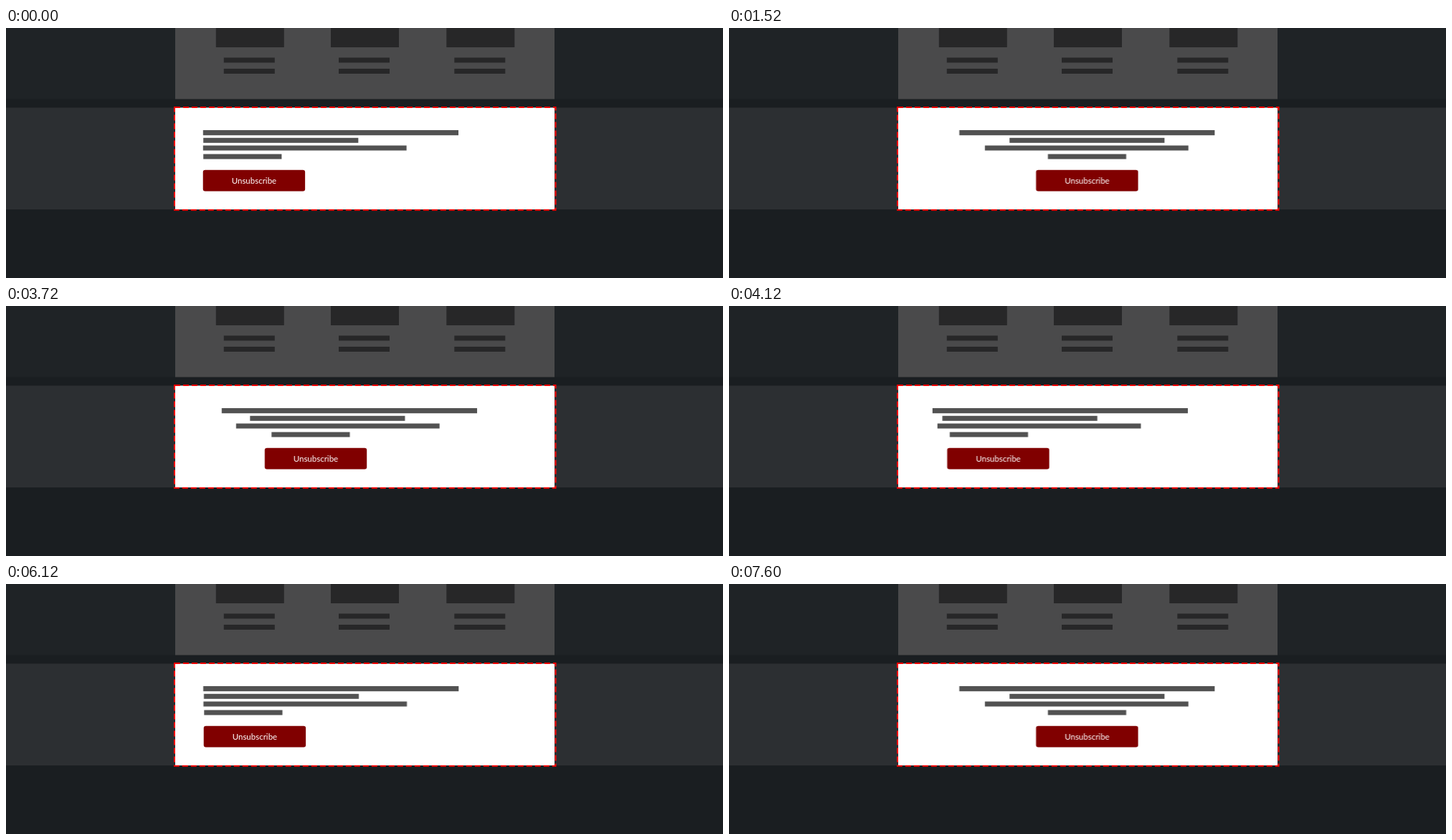
Animation of 1000 by 350 pixels, one loop 8 s. Source, as an HTML page:

```html
<!DOCTYPE html>
<html lang="en">
<head>
<meta charset="utf-8">
<title>Alignment</title>
<style>
  html, body { margin: 0; width: 100%; height: 100%; overflow: hidden; background: #1a1e21; }
  svg { display: block; width: 1000px; height: 350px; }
  .tile { fill: #272728; }
  .line { fill: #525252; }
  .slide {
    animation: align 8s cubic-bezier(.3333, 0, .6667, 1) -11ms infinite;
  }
  text { font: 11.5px Lato, sans-serif; fill: #fff; text-anchor: middle; }

  /* left, centre, left, centre, with holds between the moves */
  @keyframes align {
    0%, 37.8125% { transform: translateX(0); }
    19.25% { transform: translateX(var(--dx)); }
    37.8125% { transform: translateX(var(--dx)); }
    57.0625%, 75.725% { transform: translateX(0); }
    94.975%, 100% { transform: translateX(var(--dx)); }
  }
  @keyframes align {
    0% { transform: translateX(0); }
    19.25%, 37.8125% { transform: translateX(var(--dx)); }
    57.0625%, 75.725% { transform: translateX(0); }
    94.975%, 100% { transform: translateX(var(--dx)); }
  }
</style>
</head>
<body>
<svg viewBox="0 0 1000 350">
  <defs>
    <g id="card" class="tile">
      <rect width="95" height="27"/>
      <rect x="11" y="41.5" width="71" height="7"/>
      <rect x="11" y="57" width="71" height="7"/>
    </g>
  </defs>

  <rect width="1000" height="99.5" fill="#1f2326"/>
  <rect y="111.5" width="1000" height="142.5" fill="#2c2f32"/>

  <rect x="236" width="529" height="99.5" fill="#4a4a4b"/>
  <use href="#card" x="292.8"/>
  <use href="#card" x="453"/>
  <use href="#card" x="614.3"/>

  <rect x="236" y="111.5" width="529" height="142.5" fill="#fff"/>
  <rect x="235" y="111" width="531.5" height="143.8" fill="none"
        stroke="#f00" stroke-width="2" stroke-dasharray="8 4"/>

  <rect class="line slide" style="--dx: 46.4px" x="274.8" y="143" width="356.2" height="7.2"/>
  <rect class="line slide" style="--dx: 116.1px" x="275.2" y="153.8" width="216.1" height="7"/>
  <rect class="line slide" style="--dx: 82.1px" x="274.8" y="164.5" width="283.8" height="7"/>
  <rect class="line slide" style="--dx: 169.6px" x="275.2" y="176.5" width="109.2" height="7"/>

  <g class="slide" style="--dx: 153.5px">
    <rect x="274.7" y="198.8" width="142.4" height="29.8" rx="3" fill="#800000"/>
    <text x="345.9" y="218">Unsubscribe</text>
  </g>
</svg>
</body>
</html>
```
